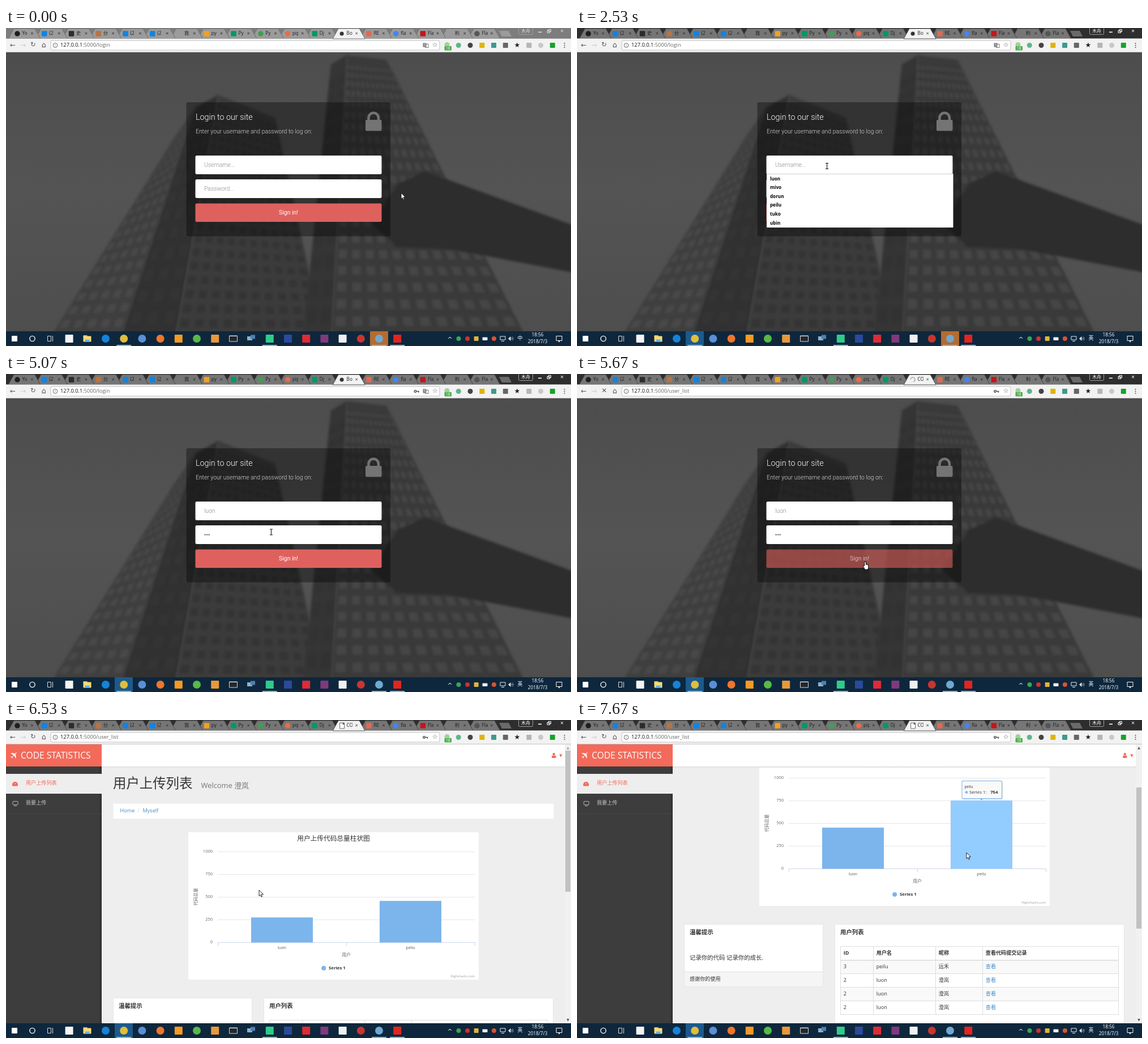
Animation of 998x561 px, one loop 8 s. Source, as an HTML page with a canvas:

```html
<!DOCTYPE html>
<html lang="zh-CN">
<head>
<meta charset="utf-8">
<title>Login demo</title>
<style>
html, body { margin: 0; width: 100%; height: 100%; overflow: hidden; background: #505050; }
canvas { display: block; width: 100vw; height: 100vh; }
</style>
</head>
<body>
<canvas id="stage" width="998" height="561"></canvas>
<script>
const W = 998, H = 561, LOOP = 8000;
const UI = '"Open Sans", "Noto Sans CJK SC", "Noto Sans CJK", sans-serif';
const FORM = 'Roboto, "Noto Sans CJK SC", sans-serif';
const USERS = ['luon', 'mivo', 'dorun', 'peilu', 'tuko', 'ubin'];
const NICK = ['澄岚', '远禾'];
const CORAL = '#f36a5a', BLUE = '#7cb5ec', LINK = '#428bca';

// Key moments in ms
const FOCUS = 2000, PICK = 2730, CHOSEN = 2930, TAB = 3420, KEYS = [4070, 4200, 4330];
const HOVER = 5170, SUBMIT = 5470, PAGE = 5800, FONTS = 5870, CONTENT = 5930, LOADED = 6330;
const SCROLL = 6900, TIP = 7430;

const stage = document.getElementById('stage').getContext('2d');
let g = stage;

// ---- helpers ----
const clamp = v => Math.max(0, Math.min(1, v));
const span = (t, a, b) => (1 - Math.cos(Math.PI * clamp((t - a) / (b - a)))) / 2;
const mix = (a, b, p) => a + (b - a) * p;
const repeat = (n, f) => { for (let i = 0; i < n; i++) f(i); };

function box(x, y, w, h, color, r = 0) {
  g.fillStyle = color;
  if (!r) return g.fillRect(x, y, w, h);
  g.beginPath(); g.roundRect(x, y, w, h, r); g.fill();
}
function frame(x, y, w, h, color, r = 0) {
  g.strokeStyle = color; g.lineWidth = 1;
  g.beginPath(); g.roundRect(x + .5, y + .5, w - 1, h - 1, r); g.stroke();
}
function panel(x, y, w, h) {
  box(x, y, w, h, '#fff');
  frame(x, y, w, h, '#e6e6e6');
}
function dot(x, y, r, color) {
  g.fillStyle = color;
  g.beginPath(); g.arc(x, y, r, 0, 7); g.fill();
}
function arc(x, y, r, a, b, color, w = 1) {
  g.strokeStyle = color; g.lineWidth = w;
  g.beginPath(); g.arc(x, y, r, a, b); g.stroke();
}
function trace(pts) {
  g.beginPath();
  for (const [x, y] of pts) g.lineTo(x, y);
}
function poly(pts, fill, stroke) {
  trace(pts); g.closePath();
  g.fillStyle = fill; g.fill();
  if (stroke) { g.strokeStyle = stroke; g.lineWidth = .9; g.stroke(); }
}
function text(s, x, y, size, color, { weight = 400, align = 'left', font = UI } = {}) {
  g.font = `${weight} ${size}px ${font}`;
  g.textAlign = align; g.textBaseline = 'middle'; g.fillStyle = color;
  g.fillText(s, x, y);
}
const MID = { align: 'center' }, RIGHT = { align: 'right' }, BOLD = { weight: 700 };
const glyph = (s, x, y, size, color) =>
  text(s, x, y, size, color, { align: 'center', font: '"DejaVu Sans", sans-serif' });

// A badge is a colour, with " o" added for a round one
function badge(spec, x, y, size) {
  const [color, round] = spec.split(' ');
  if (!color) return;
  round ? dot(x, y, size / 2, color) : box(x - size / 2, y - size / 2, size, size, color, 1);
}

// ---- login page ----
// Each edge is [x at top, top y, x at bottom]; each face lies between two edges
function tower(edges, faces) {
  faces.forEach(([wall, pane, cols, rows], k) => {
    const [a, b] = [edges[k], edges[k + 1]], foot = 540;
    const at = (u, v) => {
      const top = mix(a[1], b[1], u), d = v ** 1.4;
      return [mix(mix(a[0], b[0], u), mix(a[2], b[2], u), d), mix(top, foot, d)];
    };
    poly([at(0, 0), at(1, 0), at(1, 1), at(0, 1)], wall);
    repeat(cols * rows, n => {
      const u = (n % cols + .2) / cols, v = (Math.floor(n / cols) + 2) / (rows + 2);
      const u2 = u + .6 / cols, v2 = v + .5 / rows;
      poly([at(u, v), at(u2, v), at(u2, v2), at(u, v2)], pane);
    });
  });
}
function makePhoto() {
  const c = document.createElement('canvas');
  c.width = W; c.height = H;
  g = c.getContext('2d');
  const sky = g.createLinearGradient(0, 43, 0, 535);
  ['#4d4d4d', '#545454', '#4e4e4e'].forEach((s, i) => sky.addColorStop(i / 2, s));
  box(0, 0, W, H, sky);
  g.filter = 'blur(2px)';
  tower([[300, 190, 82], [335, 140, 205], [375, 118, 300], [475, 158, 560]],
    [['#3f3f3f', '#494949', 5, 18], ['#313131', '#343434', 3, 12], ['#3c3c3c', '#343434', 10, 20]]);
  tower([[574, 64, 525], [602, 48, 575], [672, 56, 915]],
    [['#353535', '#323232', 2, 12], ['#3a3a3a', '#464646', 11, 20]]);
  poly([[740, 253], [1010, 351], [1010, 433], [785, 390], [690, 386], [645, 345], [692, 275]], '#2d2d2d');
  g.filter = 'none';
  g = stage;
  return c;
}
const photo = makePhoto();

function field(y, value) {
  box(334.5, y, 329, 33, '#fff', 2.5);
  text(value, 350, y + 17.2, 10.4, '#888', { weight: 300, font: FORM });
}
function caret(t, typed) {
  const last = [FOCUS, PICK, CHOSEN, TAB, ...KEYS].filter(k => k <= t).pop();
  if (!last || t > HOVER || (t - last) % 1000 >= 500) return;
  const x = last < PICK ? 350 : last < TAB ? 373 : 350 + 3.6 * typed;
  box(x, last < TAB ? 235 : 277.5, 1, 12, '#333');
}
function login(t) {
  const light = { weight: 300, font: FORM };
  const typed = KEYS.filter(k => k <= t).length;
  g.drawImage(photo, 0, 0);
  box(318.5, 131, 360.5, 236.5, 'rgba(0,0,0,.37)', 3);
  text('Login to our site', 335, 157.6, 14.3, '#fff', light);
  text('Enter your username and password to log on:', 335, 183, 10.4, '#d8d8d8', light);
  box(635, 162, 28.5, 19.5, '#747474', 2);
  arc(649.2, 158.5, 8.7, Math.PI, 0, '#747474', 4.5);
  for (const side of [-1, 1]) box(649.2 + side * 8.7 - 2.25, 158, 4.5, 5, '#747474');

  field(225, t < PICK ? 'Username...' : USERS[0]);
  field(267, typed ? '' : 'Password...');
  repeat(typed, i => dot(351.6 + 3.5 * i, 283.5, 1.3, '#777'));

  g.globalAlpha = 1 - .4 * clamp((t - HOVER) / 300);
  box(334.5, 309.5, 329, 32.5, '#de615e', 2.5);
  text('Sign in!', 499, 326.4, 10.4, '#fff', { align: 'center', font: FORM });
  g.globalAlpha = 1;
  caret(t, typed);

  if (t < FOCUS + 70 || t >= CHOSEN) return;
  box(335, 257, 329.5, 95, '#fff');
  box(335, 257, 329.5, 1, '#d0d0d0');
  if (t >= PICK) box(335, 258, 329.5, 15.8, '#e4e4e4');
  USERS.forEach((u, i) => text(u, 341, 266.5 + 15.6 * i, 8.1, '#000', BOLD));
}

// ---- dashboard ----
function tooltip(t) {
  g.globalAlpha = clamp((t - TIP) / 130);
  box(681, 238.5, 71, 32, 'rgba(0,0,0,.12)', 2);
  poly([[711, 268], [718, 268], [714.5, 272]], BLUE);
  box(679.5, 237, 71.5, 32, BLUE, 2);
  box(680.5, 238, 69.5, 30, '#f9f9f9', 1.5);
  text(USERS[3], 684.5, 248, 6.5, '#333');
  dot(688, 257.5, 2.3, BLUE);
  text('Series 1:', 693, 257.5, 7.8, '#333');
  text('754', 743.5, 257.5, 7.8, '#333', { ...BOLD, ...RIGHT });
  g.globalAlpha = 1;
}
function chart(t) {
  const hover = t >= TIP, grow = span(t, 5990, 6940), base = 392;
  box(322, 198, 513, 260, '#fff');
  text('用户上传代码总量柱状图', 578.5, 210, 11.7, '#333', MID);
  repeat(5, i => {
    const y = base - 40 * i;
    box(374, y, 454.5, 1, i ? '#e6e6e6' : '#ccd6eb');
    text(250 * i, 365, y + .5, 7.5, '#666', RIGHT);
  });
  repeat(3, i => box(374 + 227 * i, base, 1, 6.5, '#ccd6eb'));
  [[USERS[0], 454], [USERS[3], 754]].forEach(([name, value], i) => {
    const x = 433 + 227 * i, h = value * .16 * grow;
    box(x, base + .5 - h, 109, h, i && hover ? '#93ccff' : BLUE);
    text(name, x + 54.5, 402, 7.2, '#555', MID);
  });
  g.save(); g.translate(336, 312); g.rotate(-Math.PI / 2);
  text('代码总量', 0, 0, 7.8, '#666', MID);
  g.restore();
  text('用户', 601, 414.5, 7.8, '#666', MID);
  dot(561.2, 437.7, 4, BLUE);
  text('Series 1', 570, 438, 7.8, '#333', BOLD);
  text('Highcharts.com', 828, 452.5, 5.85, '#999', RIGHT);
  if (hover) tooltip(t);
}
function tables() {
  panel(189, 490, 246, 111);
  text('温馨提示', 199, 505, 10.4, '#333', BOLD);
  text('记录你的代码 记录你的成长.', 199, 550, 10.4, '#333');
  box(190, 574, 244, 26, '#f5f5f5');
  box(190, 574, 244, 1, '#ddd');
  text('感谢你的使用', 199, 588, 9.1, '#333');

  panel(455, 490, 512, 240);
  text('用户列表', 465, 505, 10.4, '#333', BOLD);
  const cols = [465, 523, 633, 716, 956], mine = ['2', USERS[0], NICK[0], '查看'];
  const rows = [['ID', '用户名', '昵称', '查看代码提交记录'], ['3', USERS[3], NICK[1], '查看'], mine, mine, mine];
  rows.forEach((row, i) => {
    const y = 529 + 24 * i;
    if (i % 2) box(465, y, 492, 24, '#f9f9f9');
    box(465, y, 492, i === 1 ? 1.6 : 1, '#ddd');
    row.forEach((s, k) => text(s, cols[k] + 5.8, y + 12.3, 9.1, i && k === 3 ? LINK : '#333', i ? {} : BOLD));
  });
  box(465, 649, 492, 1, '#ddd');
  cols.forEach(x => box(x, 529, 1, 120, '#ddd'));
}
function sidebar(ready) {
  box(0, 82, 169, 453, '#3d3d3d');
  const shade = g.createLinearGradient(163, 0, 169, 0);
  shade.addColorStop(0, 'rgba(0,0,0,0)'); shade.addColorStop(1, 'rgba(0,0,0,.22)');
  box(163, 82, 6, 453, shade);
  box(0, 95, 169, 35, '#eee');
  box(0, 165, 169, 1, '#484848');
  box(0, 43, 169, 39, CORAL);
  if (!ready) return;
  g.save(); g.translate(15.5, 63); g.rotate(-Math.PI / 4);
  glyph('✈', 0, 0, 18, '#fff');
  g.restore();
  text('CODE STATISTICS', 26, 63.5, 15.6, '#fff');
  arc(16, 114, 3.6, Math.PI, 0, CORAL, 3);
  box(11, 113, 10, 3.5, CORAL, 1);
  text('用户上传列表', 35, 112, 9.1, CORAL);
  frame(11.5, 143, 10, 7, '#b5b5b5', 1);
  box(14, 151, 5, 1, '#b5b5b5');
  text('我要上传', 35, 147, 9.1, '#c4c4c4');
}
function dash(t) {
  const ready = t >= FONTS;
  const scroll = 65 * (span(t, SCROLL, SCROLL + 160) + span(t, SCROLL + 130, SCROLL + 300));
  box(0, 43, W, 492, '#eee');
  g.save();
  g.translate(0, -scroll);
  panel(188.5, 146.5, 780, 29);
  if (ready) {
    text('用户上传列表', 189, 114, 23.4, '#333');
    text('Welcome ' + NICK[0], 344.5, 117, 12.9, '#777');
    text('Home', 201.5, 161, 9.1, LINK);
    text('/', 232.5, 161, 9.1, '#ccc');
    text('Myself', 241.5, 161, 9.1, LINK);
  }
  if (t >= CONTENT) { chart(t); tables(); }
  g.restore();
  box(169, 43, 818, 39, '#fff');
  box(169, 82, 818, 1, '#dcdcdc');
  box(169, 83, 818, 1, '#e8e8e8');
  if (ready) {
    dot(967.7, 60.3, 2.2, CORAL);
    box(964, 62.8, 7.5, 4.2, CORAL, 1.5);
    glyph('▼', 980, 63, 7, CORAL);
  }
  sidebar(ready);
  box(987, 43, 11, 492, '#f1f1f1');
  box(988, 54 + scroll / 2, 9, 249, '#c1c1c1');
  glyph('▲', 992.5, 49, 6, scroll ? '#505050' : '#a3a3a3');
  glyph('▼', 992.5, 529.5, 6, '#505050');
}

// ---- browser frame ----
const TITLES = 'Yo,(2,史,分,(2,(2,我,py,Py,Py,pip,Dj,Bo,RE,fla,Fla,利,Fla'.split(',');
const BADGES = ('#1b1f23 o,#0f84e5,#2c2c2c,#b97342,#0f84e5,#0f84e5,,#f2a122,#009a61,#3da14f o,#ee6a45 o,' +
  '#009a61,#333 o,#e5684f,#4285f4 o,#c3161c,,#555 o').split(',');
const TOOLS = '#5db58a o,#444 o,#e0b400,#3c9a8d,#666,,#b5b5b5,#c8c8c8 o,#16a22b'.split(',');
const ACTIVE = 12;

function key(x) {
  arc(x - 2.5, 30.5, 1.8, 0, 7, '#555', 1.4);
  box(x - .5, 29.8, 5, 1.4, '#555');
  box(x + 2.5, 30, 1.4, 3, '#555');
}
function tab(i, t) {
  const c = 46 + 47.76 * i, x = c - 26;
  const on = i === ACTIVE, front = t >= FOCUS, sent = on && t >= SUBMIT;
  const shape = [[c - 42, 19], [c - 32, 1], [c + 5, 1], [c + 15, 19]];
  poly(shape, on ? '#f2f2f2' : front ? '#767676' : '#9b9b9b', front ? '#444' : '#6a6a6a');
  if (sent && t < LOADED) {
    const a = t / 200;
    arc(x, 10, 4, a, a + 3 + 1.4 * Math.sin(t / 210), '#777');
  } else if (sent) {
    box(x - 3.5, 5, 8, 10, '#fff');
    frame(x - 4, 4.5, 9, 11, '#666');
    box(x + 1.5, 5, 3, 3, '#666');
  } else badge(BADGES[i], x, 10, on ? 7 : 9.5);
  g.save();
  g.beginPath(); g.rect(c - 18, 0, 11, 19); g.clip();
  text(sent ? 'CODE' : TITLES[i], c - 17.5, 10, 8.2, '#1c1c1c');
  g.restore();
  glyph('✕', c, 10, 7, on ? '#444' : '#2c2c2c');
}
function titleBar(t) {
  const front = t >= FOCUS, ink = front ? '#fff' : '#ddd';
  box(0, 0, W, 19, front ? '#2e2e2e' : '#7d7d7d');
  for (let i = TITLES.length - 1; i >= 0; i--) if (i !== ACTIVE) tab(i, t);
  poly([[871, 5], [888, 5], [893, 15], [876, 15]], front ? '#6a6a6a' : '#9b9b9b');
  box(0, 18, W, 1, '#999');
  box(0, 19, W, 24, '#f2f2f2');
  tab(ACTIVE, t);
  box(0, 42, W, 1, '#c4c4c4');
  frame(905, -2, 26, 14, '#a0a0a0', 2);
  text(NICK.length && '木舟', 918, 6, 8, ink, MID);
  box(940, 6.5, 6, 1.6, ink);
  frame(957.5, 2, 5.5, 5, ink);
  frame(955.5, 4, 5.5, 5, ink);
  glyph('✕', 982, 6, 8, ink);
}
function toolbar(t) {
  const sent = t >= SUBMIT, ink = '#555';
  glyph('←', 12, 30.5, 12, ink);
  glyph('→', 30, 30.5, 12, '#ccc');
  glyph(sent && t < LOADED ? '✕' : '↻', 48, 30.5, 11.5, ink);
  glyph('⌂', 67, 30.5, 13, ink);
  box(78.5, 21.5, 688, 18, '#fff', 2);
  frame(78.5, 21.5, 688, 18, '#bdbdbd', 2);
  arc(87, 30.5, 3.8, 0, 7, ink, .9);
  text('i', 87, 30.5, 6, ink, MID);
  const host = '127.0.0.1';
  text(host, 96, 30.5, 9.3, '#111');
  text(sent ? ':5000/user_list' : ':5000/login', 96 + g.measureText(host).width, 30.5, 9.3, '#666');
  if (sent) key(741);
  else {
    if (t >= KEYS[0]) key(725.5);
    box(736.5, 26.5, 6, 7, '#777');
    frame(740, 28, 6.5, 7, '#777');
    text('文', 739.5, 30, 4.5, '#fff', MID);
  }
  glyph('☆', 757.7, 30.5, 11, ink);
  dot(779, 29.5, 4.5, '#a6cf9a');
  box(774.5, 32, 12.5, 7.5, '#4caf50', 1);
  text('18', 780.7, 35.8, 6.5, '#fff', MID);
  TOOLS.forEach((s, i) => badge(s, 799.3 + 20.75 * i, 30.5, 9));
  glyph('★', 903, 30.5, 12, '#222');
  repeat(3, i => dot(986.5, 27 + 3.5 * i, 1, ink));
}

// ---- taskbar ----
const APPS = ('#fff,,,#f4f4f4,,#1583d8 o,#e0bd3c o,#5b8fd6 o,#f0752b o,#f59a23,#58b947 o,#e9983a,,,' +
  '#2fcb8b,#2b4a9b,#e02b34,#80397b,#f0f0f0,#c7362f o,#6fa9d0 o,#e3241f').split(',');
const TRAY = '#36a852 o,#d32f2f o,#e0b43c,,#e0512d o'.split(',');

function taskbar(t) {
  const slot = i => 15 + 32.2 * i;
  box(0, 535, W, 26, '#0e273d');
  if (t >= FOCUS) box(192, 535, 32, 26, '#1c5a8c');
  if (t < 4670) box(643, 535, 32, 26, '#b56c30');
  for (const i of [6, 14, 20, 21]) box(slot(i) - 13, 559, 26, 2, '#76b9ed');
  APPS.forEach((s, i) => badge(s, slot(i), 548, i ? 14 : 10));
  arc(46.5, 548, 4.6, 0, 7, '#fff', 1.4);
  frame(73, 543, 7, 10, '#ddd');
  box(82, 543, 1, 10, '#ddd');
  box(136.5, 542, 7, 4, '#e5b64a');
  box(136.5, 543.5, 14, 10, '#f7d97b', 1);
  box(139.5, 549.5, 8, 4, '#62b4e4');
  box(394, 542.5, 15, 11, '#d8d8d8', 1);
  box(395, 544, 13, 8.5, '#22282c');
  box(426, 544, 9, 7, '#8fb0c8');
  box(432, 541.5, 8, 7, '#4e82b0');

  const ink = '#eee';
  glyph('^', 784, 550, 11, ink);
  TRAY.forEach((s, i) => badge(s, 799.5 + 15.6 * i, 548, 8));
  box(841.5, 545.5, 9, 5.5, ink, 1);
  frame(872.5, 543.5, 10, 7, ink);
  box(875, 552, 5, 1, ink);
  poly([[887, 548], [891.5, 544], [891.5, 552]], ink);
  arc(891.5, 548, 2.5, -.9, .9, ink, .9);
  arc(891.5, 548, 4.7, -.9, .9, '#999', .9);
  text(t < FOCUS ? '中' : '英', 908, 548, 9, '#fff', MID);
  text('18:56', 939, 542, 8.3, '#fff', MID);
  text('2018/7/3', 939, 554, 8.3, '#fff', MID);
  frame(971.5, 543, 11, 9, '#fff');
  glyph('▾', 977, 553, 6, '#fff');
}

// ---- pointer ----
// start, end, x, y of each move
const MOVES = [[330, 1130, 441, 243], [4870, 5330, 508, 331], [6070, 6480, 447, 300], [7170, 7560, 688, 234]];

function beam() {
  box(0, -4, 1.1, 9, '#111');
  box(-2, -5, 5, 1, '#111');
  box(-2, 5, 5, 1, '#111');
}
function hand() {
  // Dark silhouette, then the same parts slightly smaller in white
  for (const [color, e] of [['#111', .5], ['#fff', -.4]]) {
    box(0 - e, 0 - e, 2.4 + 2 * e, 9 + 2 * e, color, 1);
    box(-2.5 - e, 7.5 - e, 5 + 2 * e, 3.5 + 2 * e, color, 1);
    box(-.5 - e, 5 - e, 7 + 2 * e, 9 + 2 * e, color, 1.8);
  }
}
function arrow() {
  poly([[0, 0], [0, 10.5], [2.4, 8.4], [4, 12], [5.7, 11.2], [4.1, 7.7], [7.3, 7.4]], '#fff', '#111');
}
function pointer(t) {
  let x = 698, y = 291;
  for (const [a, b, tx, ty] of MOVES) {
    const p = span(t, a, b);
    x = mix(x, tx, p); y = mix(y, ty, p);
  }
  const form = t < PAGE && x > 335 && x < 663;
  const inField = form && ((y > 225 && y < 258) || (y > 267 && y < 300));
  const onButton = (form && y > 309) || (t >= PAGE && t < MOVES[2][0]);
  g.save();
  g.translate(x, y);
  (inField ? beam : onButton ? hand : arrow)();
  g.restore();
}

function tick(now) {
  const t = now % LOOP;
  t < PAGE ? login(t) : dash(t);
  titleBar(t);
  toolbar(t);
  taskbar(t);
  pointer(t);
  requestAnimationFrame(tick);
}
requestAnimationFrame(tick);
</script>
</body>
</html>
```
